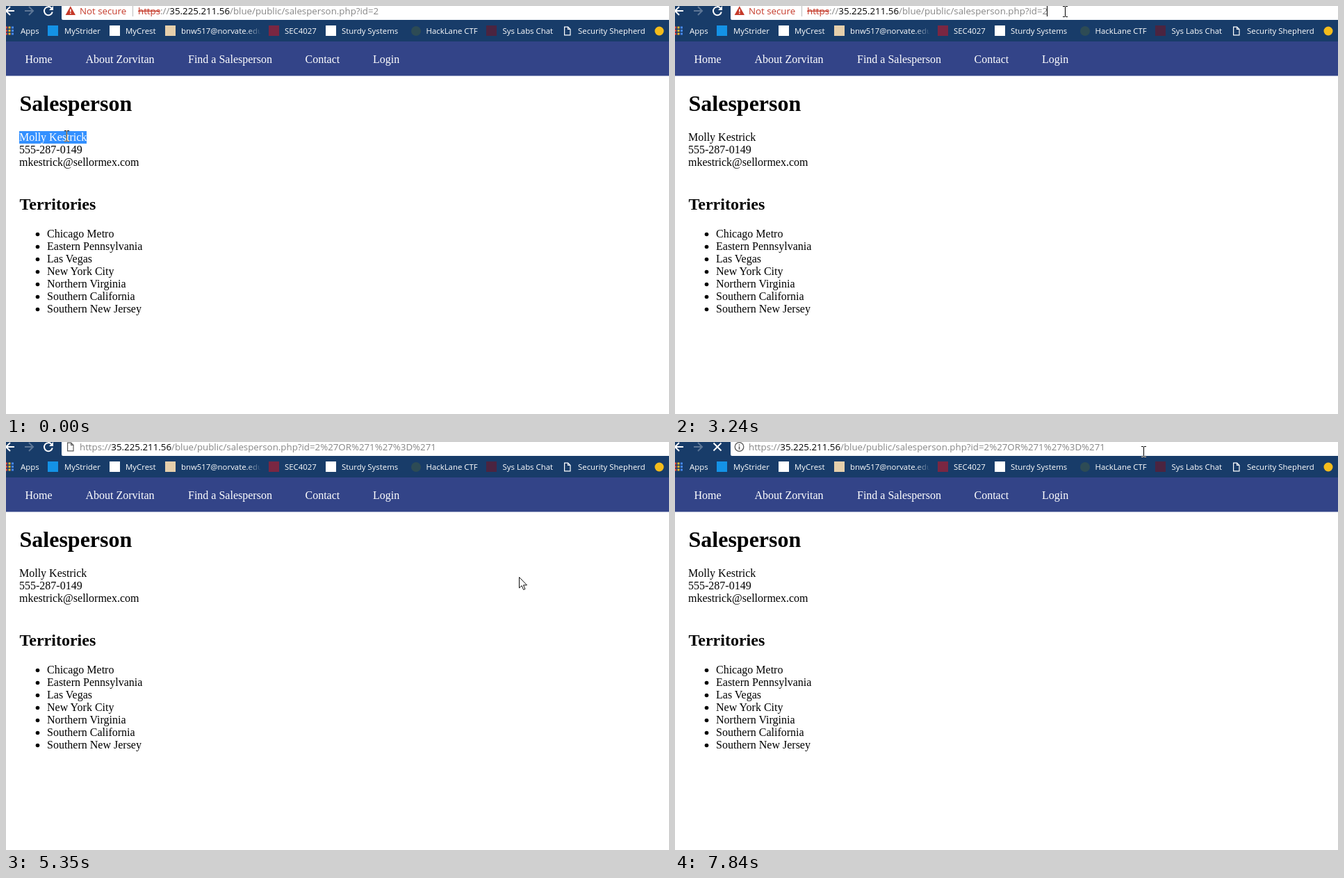
These frames come from a looping animation (954 px wide and 587 px high, 8000 ms). An HTML page:

```html
<!DOCTYPE html>
<html lang="en">
<head>
<meta charset="utf-8">
<title>Salesperson page</title>
<style>
html, body { margin: 0; width: 100%; height: 100%; overflow: hidden; background: #fff; }
svg { display: block; width: 954px; height: 587px; background: #fff; }
text { white-space: pre; }
.page { font: 16px "Liberation Serif", serif; }
.nav { fill: #fff; }
.h1 { font: bold 32px "Liberation Serif", serif; }
.h2 { font: bold 24px "Liberation Serif", serif; }
.ui { font: 13.3px "Open Sans", sans-serif; }
.marks { font: 11.4px "Open Sans", sans-serif; fill: #fff; }
.gray { fill: #868686; }
.red { fill: #c53929; }
.struck { text-decoration: line-through; }
.line { fill: none; stroke: #fff; stroke-width: 2; }
.doc { fill: none; stroke-width: 1.2; }
#beam { fill: #fff; mix-blend-mode: difference; }
</style>
</head>
<body>
<svg viewBox="0 0 954 587">
  <defs>
    <path id="sheet" class="doc" d="M.6.6h5l3.4 3.4v8.4h-8.4zM5.6.6v3.4h3.4"/>
    <linearGradient id="fade">
      <stop offset="0" stop-color="#183c69" stop-opacity="0"/>
      <stop offset=".8" stop-color="#183c69"/>
    </linearGradient>
  </defs>

  <g id="page" class="page">
    <path fill="#348" d="M0 50h954v50.5H0z"/>
    <path id="nameSel" fill="#3390ff" d="M19 180h97v18H19z"/>
  </g>

  <path fill="#183c69" d="M0 0h954v51H0z"/>
  <path fill="#fff" d="M82 0h872v20H82q-2 0-2-2V0z"/>
  <path class="line" d="M12 7H1M6 1L0 7l6 6"/>
  <path class="line" opacity=".3" d="M27 7h12M33 1l6 6-6 6"/>
  <g id="reload">
    <path class="line" d="M65.5 3.2A6 6 0 1 0 66.8 8.5"/>
    <path fill="#fff" d="M68 0v6h-6z"/>
  </g>
  <path id="stop" class="line" d="M55.5 1.5l11 11m0-11l-11 11"/>

  <g id="marks" class="marks">
    <circle cx="940" cy="36" r="6.5" fill="#f4bc1c"/>
    <use href="#sheet" x="803" y="29.5" stroke="#fff"/>
  </g>

  <g id="warn" class="ui">
    <path fill="#c53929" d="M92.800.3l7.200 12.700H85.600z"/>
    <path fill="#fff" d="M92 4.500h1.600v4H92zM92 9.700h1.600v1.600H92z"/>
    <text class="red" x="106" y="12">Not secure</text>
    <path fill="#bbb" d="M182 0h1v15h-1z"/>
    <path id="digitSel" fill="#0078d7" d="M527 0h8v16h-8z"/>
    <text x="190" y="12"><tspan class="red struck">https</tspan><tspan class="gray">://</tspan>35.225.211.56<tspan class="gray">/blue/public/salesperson.php?id=</tspan><tspan id="digit">2</tspan></text>
  </g>

  <g id="typed" class="ui">
    <use id="docIcon" href="#sheet" x="88" y=".5" stroke="#5a5a5a"/>
    <g id="info">
      <circle cx="92.500" cy="7" r="6.300" fill="none" stroke="#5a5a5a" stroke-width="1.300"/>
      <path fill="#5a5a5a" d="M91.700 3.500h1.600v1.600h-1.600zM91.700 6.200h1.600v4.600h-1.600z"/>
    </g>
    <path id="urlSel" fill="#0078d7" d="M106 0h513v15H106z"/>
    <text id="url" x="106" y="12"></text>
  </g>

  <g id="drop" class="ui">
    <path fill="#fff" d="M0 25h954v58H0z"/>
    <path fill="#0078d7" d="M81 29h873v25H81q-2 0-2-2V31q0-2 2-2z"/>
    <use href="#sheet" x="88" y="34.500" stroke="#fff"/>
    <circle cx="91" cy="64.500" r="4" fill="none" stroke="#5a5a5a" stroke-width="1.400"/>
    <path stroke="#5a5a5a" stroke-width="1.800" d="M94 67.500l4.500 4.500"/>
    <text id="hit" x="106" y="46" fill="#fff" font-weight="bold" style="font-size:13.55px"></text>
    <text id="query" x="106" y="71"></text>
    <text x="623" y="71" class="gray">- Quorva Search</text>
  </g>

  <path id="caret" fill="#000" d="M0 0h1v15H0z"/>
  <path id="beam" d="M-3-8h3v1h1v-1h3v1h-3v14h3v1h-3v-1h-1v1h-3v-1h3v-14h-3z"/>
  <path id="arrow" fill="#fff" stroke="#111" d="M.5.5v15.500l3.600-3.300 2.600 5.800 2.300-1-2.500-5.600h5z"/>
</svg>

<script>
const $ = id => document.getElementById(id);
const LOOP = 8000;

function add(parent, tag, attrs, label = '') {
  const el = document.createElementNS('http://www.w3.org/2000/svg', tag);
  for (const key in attrs) el.setAttribute(key, attrs[key]);
  el.textContent = label;
  return $(parent).appendChild(el);
}
const write = (parent, x, y, label, cls = '') =>
  add(parent, 'text', { x, y, class: cls }, label);

// Page content
[[27.5, 'Home'], [114.5, 'About Zorvitan'], [262, 'Find a Salesperson'], [430.5, 'Contact'], [528, 'Login']]
  .forEach(([x, label]) => write('page', x, 82, label, 'nav'));
write('page', 19.5, 151, 'Salesperson', 'h1');
const person = write('page', 19, 194, 'Molly Kestrick');
write('page', 19, 212, '555-287-0149');
write('page', 19, 230, 'mkestrick@sellormex.com');
write('page', 19.5, 293, 'Territories', 'h2');
['Chicago Metro', 'Eastern Pennsylvania', 'Las Vegas', 'New York City',
  'Northern Virginia', 'Southern California', 'Southern New Jersey'].forEach((label, i) => {
  add('page', 'circle', { cx: 45.5, cy: 328.5 + 18 * i, r: 2.8 });
  write('page', 59, 333 + 18 * i, label);
});

// Bookmarks bar
[[21, 'Apps'], [84, 'MyStrider'], [172, 'MyCrest'], [252, 'bnw517@norvate.edu'],
  [401, 'SEC4027'], [483, 'Sturdy Systems'], [604.5, 'HackLane CTF'],
  [714.5, 'Sys Labs Chat'], [823, 'Security Shepherd']]
  .forEach(([x, label]) => write('marks', x, 40, label));
add('marks', 'rect', { x: 345, y: 26, width: 28, height: 20, fill: 'url(#fade)' });
[[60, '#1492e6'], [149, '#fff'], [229, '#e5cfab'], [378, '#7a2742'], [460, '#fff'], [691, '#4b2440']]
  .forEach(([x, fill]) => add('marks', 'rect', { x, y: 28, width: 15, height: 15, fill }));
add('marks', 'circle', { cx: 590, cy: 36, r: 7, fill: '#2d4b55' });
const dots = ['#e8453c', '#f9bb2d', '#4688f1', '#3aa757'];
for (let i = 0; i < 9; i++)
  add('marks', 'rect', { x: -1 + i % 3 * 4.5, y: 29.5 + (i / 3 | 0) * 4.5, width: 3, height: 3, fill: dots[(i + (i / 3 | 0)) % 4] });

// Address texts
const host = '35.225.211.56';
const path = '/blue/public/salesperson.php?id=2%27OR%271%27%3D%271';
add('url', 'tspan', { class: 'gray' }, 'https://');
add('url', 'tspan', {}, host);
add('url', 'tspan', { class: 'gray' }, path);
$('hit').textContent = $('query').textContent = 'https://' + host + path;

// Pointer stops: time, shape, x, y
const pointer = [
  [0, 'beam', 87, 187], [150, 'arrow', 240, 177], [270, 'arrow', 372, 197],
  [540, 'arrow', 412, 160], [660, 'arrow', 494, 82], [780, 'arrow', 550, 22],
  [910, 'beam', 544, 7], [1070, 'beam', 542, 7], [1220, 'beam', 537, 7],
  [1370, 'beam', 533, 8], [1490, 'beam', 530, 8], [1640, 'beam', 537, 13],
  [1760, 'beam', 542, 18], [1910, 'beam', 540, 8], [2340, 'beam', 549, 8],
  [2460, 'beam', 556, 8], [3240, 'beam', 561, 8], [3950, 'beam', 567, 8],
  [4070, 'beam', 578, 8], [4190, 'beam', 586, 8], [4340, 'beam', 635, 13],
  [5080, 'arrow', 700, 120], [5200, 'arrow', 738, 194], [5600, 'arrow', 712, 90],
  [5730, 'beam', 692, 10], [5880, 'beam', 687, 8], [6030, 'beam', 684, 11],
  [6150, 'arrow', 681, 19], [6460, 'beam', 677, 16], [6580, 'beam', 675, 14],
  [7700, 'beam', 674, 14]
];
// Caret is visible in these spans
const caretOn = [[1220, 1370], [1910, 2460], [2960, 3950], [4500, 5080]];

const show = (id, on) => $(id).style.display = on ? '' : 'none';

function draw(t) {
  const within = (a, b) => t >= a && t < b;
  const pasted = t >= 3390, loading = t >= 7840;
  const picked = t < 400, digit = within(1370, 1910), all = within(6730, 7840);

  show('nameSel', picked);
  person.style.fill = picked ? '#fff' : '';
  show('warn', !pasted);
  show('digitSel', digit);
  $('digit').style.fill = digit ? '#fff' : '#868686';

  show('typed', pasted);
  show('urlSel', all);
  for (const part of $('url').children) part.style.fill = all ? '#fff' : '';
  show('drop', within(3390, 5350));
  show('docIcon', !loading);
  show('info', loading);
  show('reload', !loading);
  show('stop', loading);

  show('caret', caretOn.some(span => within(...span)));
  $('caret').setAttribute('transform', `translate(${pasted ? 619 : 535})`);

  const [, shape, x, y] = pointer.findLast(stop => t >= stop[0]);
  show('beam', shape === 'beam');
  show('arrow', shape === 'arrow');
  $(shape).setAttribute('transform', `translate(${x} ${y})`);
}

const start = performance.now();
function tick() {
  draw((performance.now() - start) % LOOP);
  requestAnimationFrame(tick);
}
tick();
</script>
</body>
</html>
```
